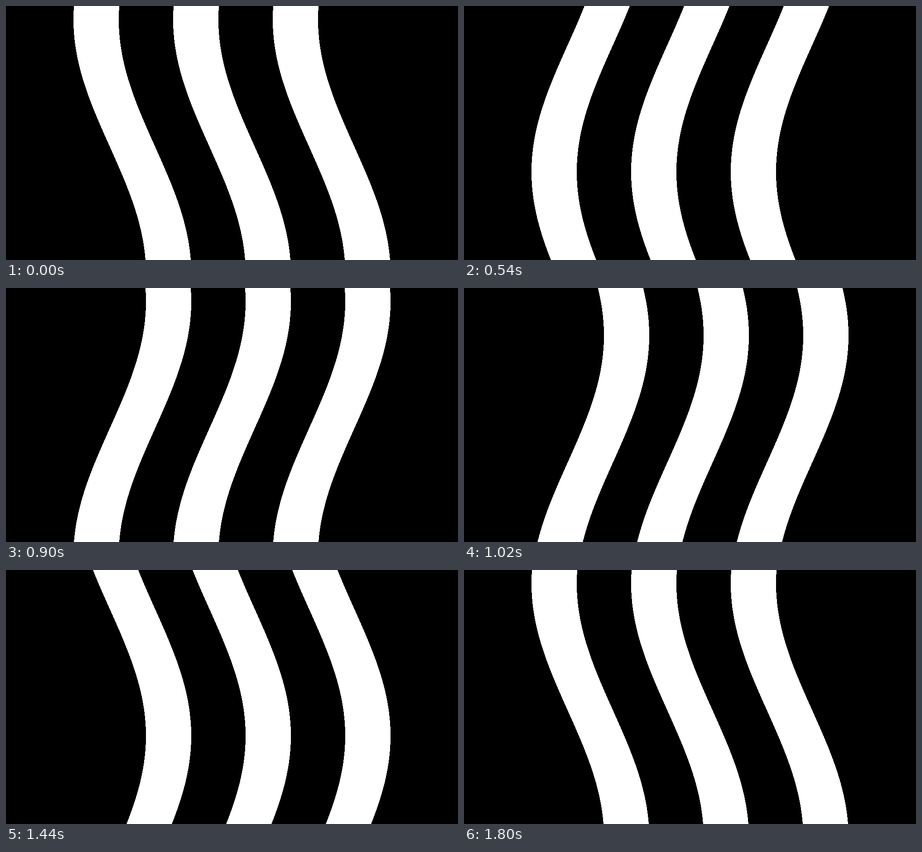
An HTML page with a canvas for the animation above (1.9 s loop, 998x561 px).

```html
<!DOCTYPE html>
<html lang="en">
<head>
<meta charset="utf-8">
<title>Waves</title>
<style>
html, body { margin: 0; width: 100%; height: 100%; overflow: hidden; background: #000; }
canvas { display: block; }
</style>
</head>
<body>
<canvas id="stage" width="998" height="561"></canvas>
<script>
const W = 998, H = 561;
const LOOP = 1900, STEP = 30, STEPS = 60;
const WAVE = 2 * H, AMP = 80, START = 29.3;
const BANDS = [229, 449, 669], BAND_WIDTH = 100;

const ctx = document.getElementById('stage').getContext('2d', { alpha: false });
const origin = performance.now();
let shown = -1;

function draw(step) {
  const trough = START + WAVE * step / STEPS;
  ctx.fillStyle = '#000';
  ctx.fillRect(0, 0, W, H);
  ctx.fillStyle = '#fff';
  // Whole-pixel rows keep the edges hard.
  for (let y = 0; y < H; y++) {
    const shift = -AMP * Math.cos(2 * Math.PI * (y - trough) / WAVE);
    for (const x of BANDS) ctx.fillRect(Math.round(x + shift), y, BAND_WIDTH, 1);
  }
}

function tick() {
  const t = (performance.now() - origin) % LOOP;
  const step = Math.min(STEPS, Math.floor(t / STEP));
  if (step !== shown) draw(shown = step);
  requestAnimationFrame(tick);
}
tick();
</script>
</body>
</html>
```
